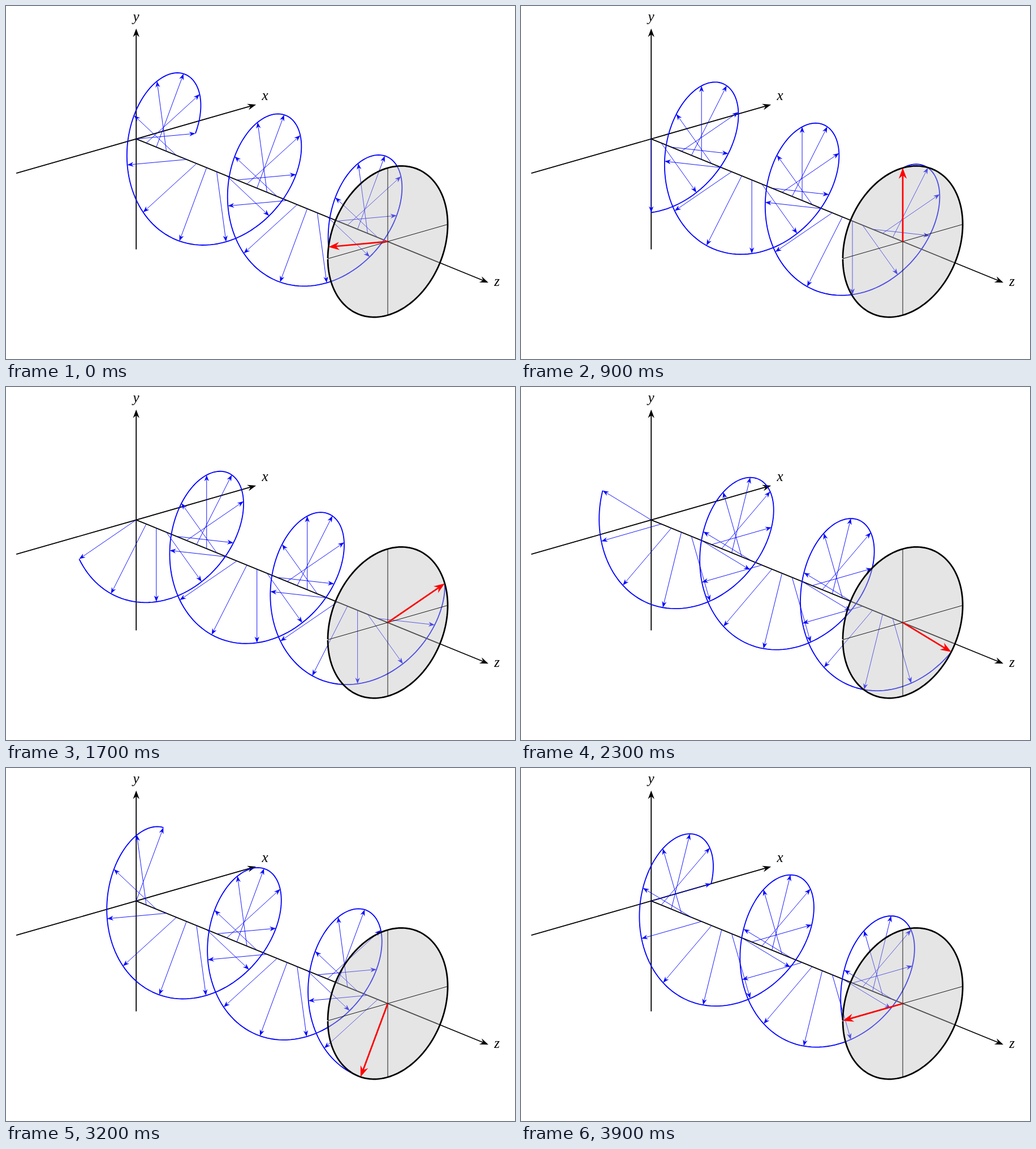
Write an HTML page that moves like this. It is 900x623 px and loops after 4000 ms.

```html
<!DOCTYPE html>
<html lang="en">
<head>
<meta charset="utf-8">
<title>Circular polarisation</title>
<style>
  html, body { margin: 0; width: 100%; height: 100%; overflow: hidden; background: #fff; }
  svg { display: block; width: 900px; height: 623px; }
  path { fill: none; }
  text { font: italic 25px "Liberation Serif", "Times New Roman", serif; text-anchor: middle; }
</style>
</head>
<body>
<svg id="stage" viewBox="0 0 900 623"></svg>
<script>
const svg = document.getElementById("stage");
const PT = 2.284;                     // pixels per point
const THIN = 0.4, THICK = 0.8, HEAVY = 1.2;
const STEPS = 40, STEP_MS = 100, ARROWS = 25, PER_TURN = 10;
const TAU = 2 * Math.PI;

// Oblique projection of (x, y, z); z = 1 lies on the disc
const project = (x, y, z) => [
  230.2 + 106 * x + 444.8 * z,
  234.6 - 30.3 * x - 129.9 * y + 181.1 * z
];
const onCircle = (a, z) => project(Math.cos(a), Math.sin(a), z);
const fmt = p => p[0].toFixed(2) + " " + p[1].toFixed(2);
const line = (...pts) => "M" + pts.map(fmt).join("L");

function add(tag, attrs, text) {
  const el = document.createElementNS("http://www.w3.org/2000/svg", tag);
  for (const k in attrs) el.setAttribute(k, attrs[k]);
  if (text) el.textContent = text;
  svg.appendChild(el);
  return el;
}
const stroke = (color, width, d = "") =>
  add("path", { stroke: color, "stroke-width": width * PT, "stroke-linejoin": "round", d });
const fill = (color, d = "") => add("path", { style: "fill:" + color, d });

// Shaft and barbed head of an arrow from p to q
function arrow(p, q, width) {
  const len = (3 + 4.5 * width) * PT, half = len * 0.375;
  const dx = q[0] - p[0], dy = q[1] - p[1], n = Math.hypot(dx, dy);
  const u = dx / n, v = dy / n;
  const at = (back, side) => [q[0] - u * back - v * side, q[1] - v * back + u * side];
  const notch = at(len * 0.675, 0);
  return {
    shaft: line(p, at(len * 0.6, 0)),
    head: line(q, at(len, half), notch, at(len, -half)) + "Z"
  };
}

function sweep(from, to, count, point) {
  const pts = [];
  for (let i = 0; i <= count; i++) pts.push(point(from + (to - from) * i / count));
  return line(...pts);
}

function axis(from, to) {
  const a = arrow(project(...from), project(...to), THICK);
  stroke("#000", THICK, a.shaft);
  fill("#000", a.head);
}

axis([-2, 0, 0], [2, 0, 0]);
axis([0, -1.5, 0], [0, 1.5, 0]);
axis([0, 0, 0], [0, 0, 1.4]);
add("text", { x: 458, y: 165.5 }, "x");
add("text", { x: 230, y: 27 }, "y");
add("text", { x: 868, y: 494 }, "z");

const helix = stroke("#00f", THICK);
const shafts = stroke("#00f", THIN);
const heads = fill("#00f");

const rim = a => onCircle(a, 1);
const gap = 0.006;
const disc = fill("#bfbfbf", sweep(0, TAU, 180, rim) + "Z");
disc.setAttribute("fill-opacity", 0.4);
stroke("#000", THIN, line(project(-1, 0, 1), project(1, 0, 1)) +
  line(project(0, -1, 1), project(0, 1, 1)));
stroke("#000", HEAVY, sweep(Math.PI + gap, 3 * Math.PI - gap, 180, rim));

const redShaft = stroke("#f00", HEAVY);
const redHead = fill("#f00");

function draw(ms) {
  const step = Math.floor(ms / STEP_MS) % STEPS;
  const phase = -TAU * (step + 1) / STEPS;
  const tip = s => onCircle(phase + TAU * s / PER_TURN, s / ARROWS);
  const field = (s, width) => arrow(project(0, 0, s / ARROWS), tip(s), width);

  helix.setAttribute("d", sweep(0, ARROWS, 300, tip));
  let sd = "", hd = "";
  for (let s = 0; s < ARROWS; s++) {
    const a = field(s, THIN);
    sd += a.shaft;
    hd += a.head;
  }
  shafts.setAttribute("d", sd);
  heads.setAttribute("d", hd);

  const r = field(ARROWS, HEAVY);
  redShaft.setAttribute("d", r.shaft);
  redHead.setAttribute("d", r.head);
}

const start = performance.now();
function tick() {
  draw(performance.now() - start);
  requestAnimationFrame(tick);
}
tick();
</script>
</body>
</html>
```
